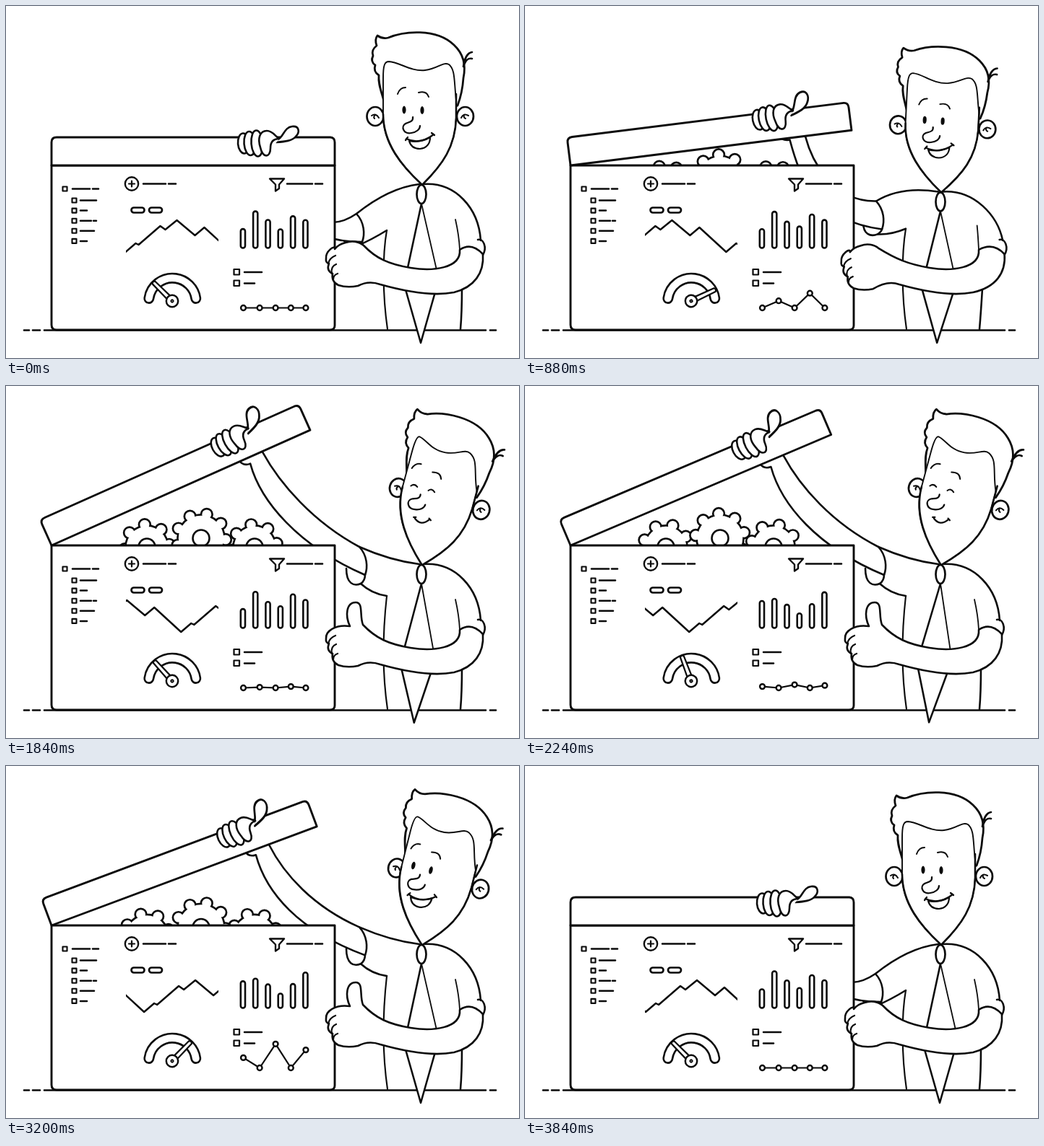
An HTML page with a canvas for the animation above (3.88 s loop, 710 px wide and 488 px high).

```html
<!DOCTYPE html>
<html>
<head>
<meta charset="utf-8">
<style>
html, body { margin: 0; width: 100%; height: 100%; overflow: hidden; background: #fff; }
canvas { display: block; }
</style>
</head>
<body>
<canvas id="stage" width="710" height="488"></canvas>
<script>
const ctx = document.getElementById('stage').getContext('2d');
const LOOP = 3880, HALF = LOOP / 2, QUARTER = LOOP / 4;
const INK = '#0b0b0b', PEN = 1.12, RAD = Math.PI / 180, TAU = 2 * Math.PI;

const mix = (a, b, k) => a + (b - a) * k;
const unit = (t, from, to) => Math.min(1, Math.max(0, (t - from) / (to - from)));
const ramp = (t, from, to) => { const k = unit(t, from, to); return k * k * (3 - 2 * k); };
const bell = (t, from, to) => Math.sin(Math.PI * unit(t, from, to)) ** 2;
const swing = (t, period, peak = 0) => Math.cos((t - peak) / period * TAU);

// Everything that moves, as a function of the loop time.
function poseAt(t) {
  const rise = ramp(t, 725, 1180);
  const open = rise - ramp(t, 3180, 3640);
  return {
    t, open,
    angle: open * (25.7 - .00255 * (t - 1200)) + 1.1 * bell(t, 1080, 1380),
    dip: 11 * bell(t, 560, 1120),
    tilt: 15 * (ramp(t, 780, 1140) - ramp(t, 3130, 3600)) - 6 * bell(t, 1220, 1660),
    thumb: ramp(t, 1120, 1320) - ramp(t, 3360, 3580),
    tie: 4 * (ramp(t, 2300, 2760) - ramp(t, 640, 880)) - 11 * bell(t, 1500, 2900),
    sink: 40 * (1 - rise + ramp(t, 2940, 3640)),
    spin: 145 - .0588 * t,
    asleep: t > 1160 && t < 2340,
    grin: t <= 1160 || t >= 2960
  };
}

function line(d, width = 2.3) {
  ctx.lineWidth = width * PEN;
  ctx.stroke(new Path2D(d));
}
function shape(d, width = 2.3) {
  ctx.fill(new Path2D(d));
  if (width) line(d, width);
}
function oval(x, y, rx, ry = rx, width = 2.3, tilt = 0) {
  ctx.beginPath();
  ctx.ellipse(x, y, rx, ry, tilt, 0, TAU);
  ctx.fill();
  ctx.lineWidth = width * PEN;
  ctx.stroke();
}
function pill(x, y, w, h, r, width = 2.4) {
  ctx.beginPath();
  ctx.roundRect(x, y, w, h, r);
  ctx.lineWidth = width * PEN;
  ctx.stroke();
}
function group(draw) {
  ctx.save();
  draw();
  ctx.restore();
}

function gear(x, y, r, teeth, turn) {
  for (const [grow, color] of [[1.4, INK], [-1.3, '#fff']]) {
    ctx.fillStyle = color;
    ctx.beginPath();
    ctx.arc(x, y, r + grow, 0, TAU);
    for (let i = 0; i < teeth; i++) {
      const a = -(turn + i * 360 / teeth) * RAD;
      const bx = x + Math.cos(a) * (r + 1.5), by = y + Math.sin(a) * (r + 1.5);
      ctx.moveTo(bx, by);
      ctx.arc(bx, by, 7.8 + grow, 0, TAU);
    }
    ctx.fill();
  }
  oval(x, y, 11.5);
}

function gears({ sink, spin }) {
  gear(195, 223 + sink, 29.5, 8, spin + 14);
  gear(344, 223 + sink, 29.5, 8, spin + 17);
  gear(270, 211 + sink, 32.5, 9, spin);
}

const cuffOf = ({ open }) => ({ x: 489 + 4 * open, y: 308 - 65 * open });

function torso({ open, dip, tie, neck, cuff: { x, y } }) {
  const pit = 311 - 20 * open + .3 * dip, hem = y + 24 + 7 * open;
  const top = `M572 ${neck}Q${530 + 2 * open - dip} ${252 - 10 * open} ${x - 4} ${y - 20}`;
  const under = `Q506 ${pit + 13 - 16 * open} 527 ${pit}`;
  const side = `C521 345 521 400 528 448`;
  shape(`${top}L${x + 4} ${y + 19}L${x - 2} ${hem}${under}${side}L629 448L657 325L578 ${neck}Z`, 0);
  line(top);
  line(`M${x - 2} ${hem}${under}`);
  line(`M527 ${pit}${side}`, 1.9);
  line(`M${x - 22} ${y + 10}C${x - 22} ${hem} ${x - 12} ${hem + 4} ${x - 2} ${hem}Q${x + 4} ${hem - 4} ${x + 4} ${y + 18}`);
  line(`M578 ${neck}C622 ${neck - 3} 654 ${neck + 33} ${657 + .4 * dip} 325`);
  line(`M${622 + .35 * dip} ${296 + .8 * dip}Q627 318 628 338`, 1.6);
  line(`M${631 + .2 * dip} 390Q631 425 629 448`);
  group(() => {
    ctx.translate(575, neck + 27);
    ctx.rotate(-tie / 193);
    ctx.scale(1, 1 - dip / 193);
    shape('M0 0L-24 112L-1 193L24 105Z', 0);
    line('M0 0L-24 112L-1 193L24 105');
    line('M24 105L0 0', 1.6);
  });
  oval(575, neck + 14, 6.5, 13, 2.4);
}

function raisedArm({ angle, cuff: { x, y } }) {
  const c = Math.cos(angle * RAD), s = Math.sin(angle * RAD);
  const lift = angle / 25, slide = 12 * Math.max(0, 1 - lift);
  const onLid = (px, py) => [63 + (px + slide) * c + py * s, 221 - (px + slide) * s + py * c];
  const bump = 9 * Math.min(1, lift);
  const [ux, uy] = onLid(319, 1), [lx, ly] = onLid(297, bump);
  const [tx, ty, bx, by] = [x - 4, y - 20, x + 4, y + 19];
  shape(`M${onLid(310, -20)}L${ux} ${uy}`
    + `C${ux + 25 * lift} ${uy + 20 + 25 * lift} ${tx - 64} ${ty + 44 - 80 * Math.sqrt(lift)} ${tx} ${ty}`
    + `C${x + 7} ${y - 8} ${x + 8} ${y + 8} ${bx} ${by}`
    + `C${bx - 93} ${by - 42 * lift} ${lx + 14} ${ly + 52} ${lx} ${ly}`
    + `Q${onLid(286, bump)} ${onLid(284, -4)}Z`);
}

function head({ neck, dip, tilt, asleep, grin }) {
  ctx.translate(575, neck);
  ctx.rotate(tilt * RAD);
  ctx.scale(1, 1 - .0044 * dip);
  ctx.translate(-575, -247);

  // Hairline and features slide sideways as the face turns.
  const mid = -.85 * tilt, edge = -.55 * tilt;
  oval(511 + .35 * tilt, 153, 11.5, 13, 2.4);
  oval(635.5, 153, 11.5, 13, 2.4);
  line(`M${506 + .35 * tilt} 152q6 -4 10 3m-5 -4q-3 3 -1 5M630 155q3 -7 10 -3m-6 -1q-1 4 2 5`, 1.8);

  shape('M523 132C519 117 515 108 516 96Q508 91 511 82Q504 77 508 69Q505 61 513 55Q510 46 514 41'
    + 'Q521 46 529 44C550 35 595 30 620 54C635 68 636 86 633 100C632 115 628 130 625 138L575 160Z', 2.5);
  line('M633 84C635 72 638 65 645 64M634 81C637 74 640 72 645 73', 2.4);
  const jaw = 'C622 195 604 220 577 247';
  shape(`M575 247C548 222 522 192 522 152L522 100C522 82 524 77 ${530 + .25 * mid} 77`
    + `C${545 + .7 * mid} 78 ${560 + mid} 91 ${580 + mid} 89C${598 + mid} 87 ${604 + mid} 77 ${613 + mid} 81`
    + `C${622 + edge} 88 ${620 + edge} 105 623 130L623 155${jaw}`, 1.7);
  line(`M522 150C522 190 548 222 575 247M623 122L623 155${jaw}`);

  ctx.translate(-.95 * tilt, 0);
  line('M542 122Q545 113 553 113M571 120Q582 117 585 126', 1.8);
  if (asleep) {
    line('M547 146q4 -5 9 -1M572 146q4 -5 9 0', 1.8);
  } else {
    ctx.fillStyle = INK;
    ctx.beginPath();
    ctx.ellipse(551, 144, 2.6, 5.4, 0, 0, TAU);
    ctx.ellipse(576, 144.5, 2.6, 5.4, 0, 0, TAU);
    ctx.fill();
    ctx.fillStyle = '#fff';
  }
  line('M563 154C564 161 557 161 553 163C546 167 550 178 561 176C568 175 573 171 573 166', 2);
  if (grin) {
    shape('M558 187C560 195 566 198 573 198C582 197 587 191 587 182Q573 190 558 187Z', 2);
    line('M554 184Q573 193 592 178M553 186l3 -4M589 176l4 3', 2);
  } else {
    line('M564 188Q575 197 584 184M562 187l3 -1M583 183l3 2', 2);
  }
}

function marks() {
  const dashes = (y, ...xs) => {
    for (let i = 0; i < xs.length; i += 2) line(`M${xs[i]} ${y}H${xs[i + 1]}`, 2.2);
  };
  pill(78.5, 250.5, 6, 6, 0, 1.9);
  dashes(253.5, 92, 116, 120, 128);
  [22, 9, 15, 19, 9].forEach((length, i) => {
    const y = 269.5 + i * 14.1;
    pill(91.5, y - 3, 6, 6, 0, 1.9);
    dashes(y, 103, 103 + length);
  });
  dashes(297.7, 121, 125);
  oval(174, 246.5, 9.2, 9.2, 2.1);
  line('M170 246.5H178M174 242.5V250.5', 2);
  dashes(246.5, 190, 221, 225, 235, 389, 424, 428, 438);
  line('M365 239.5H385L378 247.5V253L373 256.5V247.5Z', 2.1);
  for (const x of [173.5, 198]) pill(x, 279.5, 18, 7, 3.5);
  for (const [y, end] of [[369, 354], [384.5, 344]]) {
    pill(315.5, y - 4, 7.5, 7.5, 0, 2);
    dashes(y, 330, end);
  }
}

function mountains(t) {
  const ridge = [[0, 341], [14, 329], [18, 331], [48, 305], [55, 310], [71, 297], [96, 318], [109, 307]];
  const width = 146, left = 165.5 - width * t / LOOP;
  ctx.beginPath();
  ctx.rect(166, 285, 128, 65);
  ctx.clip();
  const points = [0, 1, 2].flatMap(n => ridge.map(([x, y]) => `${left + n * width + x} ${y}`));
  line('M' + points.join('L'), 2.2);
}

function bars(t) {
  const middles = [301.5, 290.5, 302, 308, 294.5, 289], lowest = [920, 460, 540, 230, 340, 930];
  middles.forEach((middle, i) => {
    const y = middle + 7 * swing(t, QUARTER, lowest[i]);
    pill(324.8 + i * 17.3, y + 1, 6.2, 334.5 - y, 3, 2.3);
  });
}

function gauge(t) {
  for (const [w, color] of [[15, INK], [9.8, '#fff']]) {
    ctx.strokeStyle = color;
    ctx.lineWidth = w;
    ctx.beginPath();
    ctx.arc(230.3, 410, 32.8, 188 * RAD, 352 * RAD);
    ctx.stroke();
  }
  ctx.strokeStyle = INK;
  ctx.translate(230, 409);
  ctx.rotate(-(79 + 56 * swing(t, HALF)) * RAD);
  shape('M4 -3.2L36 -2.6Q39 0 36 2.6L4 3.2Z', 2);
  oval(0, 0, 8.2, 8.2, 2.2);
  oval(0, 0, 1.6, 1.6, 1.8);
}

// Even dots swell in the first half of the loop, odd ones in the second.
function dots(t) {
  const u = t % HALF, swell = unit(u, 0, 1440) ** 1.4 * (1 - ramp(u, 1440, 1900));
  const heights = t < HALF ? [0, 19.5, 0, 40.5, 0] : [17, 0, 40, 0, 30];
  const points = heights.map((h, i) => [328.5 + i * 21.6 + 1.4 * Math.sin(i * Math.PI / 4), 418.5 - h * swell]);
  line('M' + points.map(p => p.join(' ')).join('L'), 2);
  for (const [x, y] of points) oval(x, y, 3.4, 3.4, 2.2);
}

function lid({ angle }) {
  ctx.translate(63, 221);
  ctx.rotate(-angle * RAD);
  shape('M0 0V-32Q0 -39 7 -39H386Q392 -38.5 392 -32V0Z', 2.6);
  ctx.translate(-63, -221);
  const grip = Math.min(1, angle / 8);
  group(() => {
    ctx.translate(378, 187);
    ctx.rotate(-14 * grip * RAD);
    ctx.scale(1, 1 + .2 * grip);
    shape('M-5 -1C6 -2 6 -19 18 -20C28 -21 29 -12 23 -6C18 0 8 1 -4 2');
  });
  shape('M358 176L378 184L366 200Z', 0);
  [[329, 14], [337.5, 16.5], [347.5, 18]].forEach(([x, r]) => oval(x, 190.5, 8, r, 2.3, -.08));
  shape('M352 196C348 184 351 173 361 173C369 173 372 180 378 184C370 184 366 188 366 197C366 211 355 211 352 196Z');
}

function frontArm({ dip, thumb }) {
  const ex = .35 * dip;
  const pt = (x, y) => `${x - .5 * dip} ${y + .4 * dip}`;
  const th = (x, y, x2, y2) => pt(mix(x, x2, thumb), mix(y, y2, thumb));
  const el = (x, y) => `${x + ex} ${y}`;
  const arm = `M628 338C630 364 590 368 560 363C530 358 512 350 ${th(495, 332, 494, 331)}`
    + `C${th(488, 326, 489, 318)} ${th(478, 325, 495, 300)} ${th(470, 328, 484, 300)}`
    + `C${th(462, 330, 471, 300)} ${th(458, 333, 469, 318)} ${th(455, 337, 476, 333)}`
    + `C${pt(456, 330)} ${pt(442, 340)} ${pt(443, 350)}Q${pt(442, 356)} ${pt(447, 357)}`
    + `Q${pt(443, 367)} ${pt(452, 371)}Q${pt(450, 382)} ${pt(460, 387)}Q${pt(472, 391)} ${pt(487, 388)}`
    + `Q502 380 518 386C550 395 590 403 620 397C${el(648, 390)} ${el(662, 370)} ${el(660, 344)}`;
  shape(arm + `Q${el(644, 327)} 628 338Z`);
  line(`M${pt(446, 357)}Q${pt(448, 349)} ${pt(456, 346)}M${pt(451, 371)}Q${pt(449, 361)} ${pt(457, 358)}`
    + `M${pt(453, 379)}Q${pt(453, 373)} ${pt(459, 371)}`, 2);
  line(`M${el(653, 324)}C${el(661, 322)} ${el(666, 335)} ${el(660, 345)}`);
}

function render(t) {
  const pose = poseAt(t);
  pose.neck = 247 + pose.dip;
  pose.cuff = cuffOf(pose);
  ctx.fillStyle = '#fff';
  ctx.fillRect(0, 0, 710, 488);
  ctx.strokeStyle = INK;
  ctx.lineCap = ctx.lineJoin = 'round';

  line('M25 449.5H32M37 449.5H47M53 449.5H664M670 449.5H678', 2.4);
  gears(pose);
  torso(pose);
  raisedArm(pose);
  group(() => head(pose));
  shape('M63 221H455V443Q455 449 448 449H70Q63 449 63 442Z', 2.6);
  marks();
  bars(t);
  dots(t);
  group(() => mountains(t));
  group(() => gauge(t));
  group(() => lid(pose));
  frontArm(pose);
}

function tick(now) {
  render(Math.floor(now % LOOP / 40) * 40);
  requestAnimationFrame(tick);
}
render(0);
requestAnimationFrame(tick);
</script>
</body>
</html>
```
